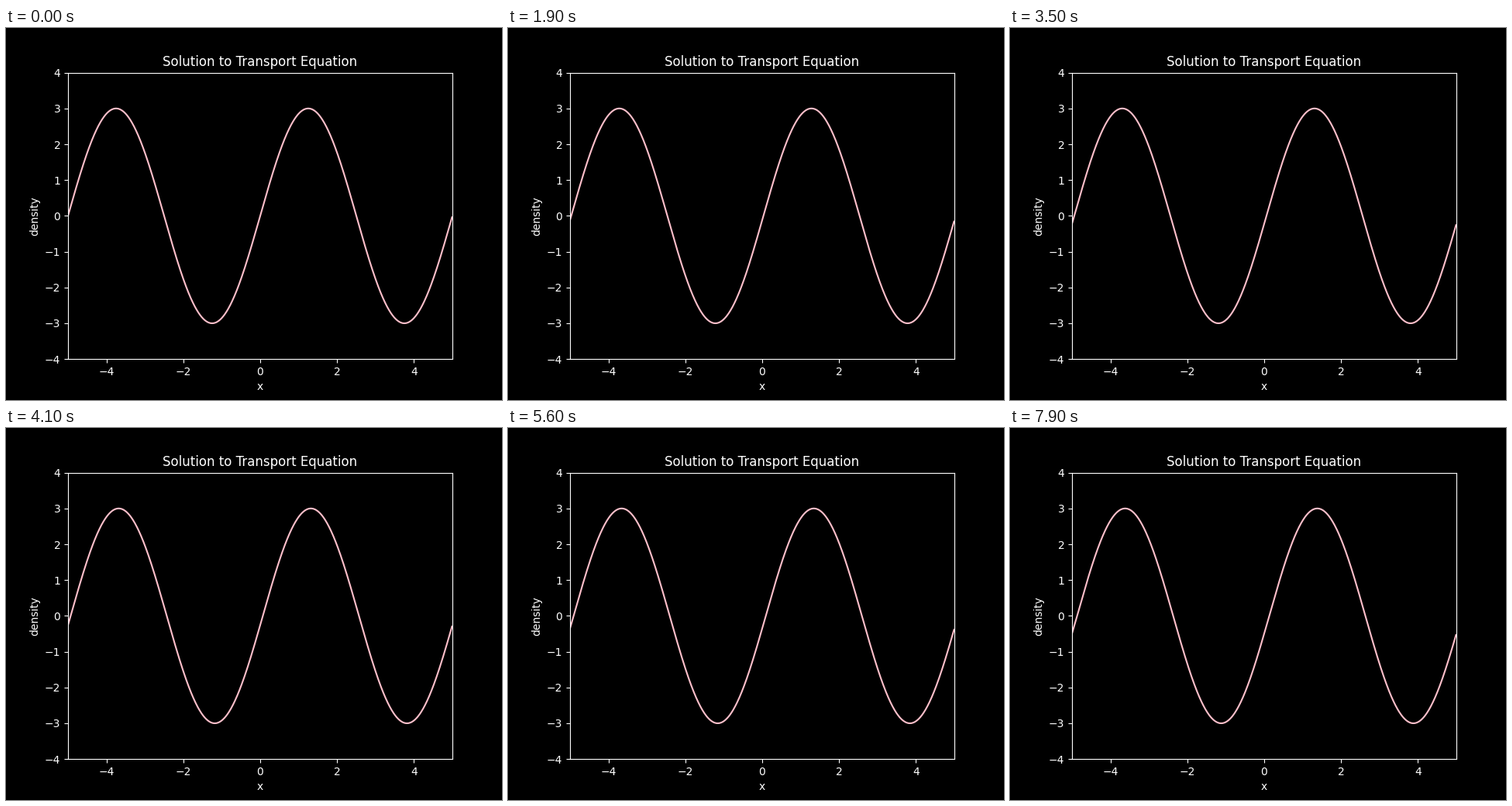
These frames come from a looping animation (640x480 px, 8000 ms). A matplotlib script:

```python
import numpy as np
import matplotlib.pyplot as plt
from matplotlib.animation import FuncAnimation

FRAMES = 80
INTERVAL = 100
AMPLITUDE = 3
WAVELENGTH = 5
STEP = 1 / 600  # distance travelled per frame

plt.style.use("dark_background")
plt.rcParams["font.family"] = "DejaVu Sans"

x = np.arange(-5, 5, 0.01)


def density(x, shift):
    return AMPLITUDE * np.sin(2 * np.pi * (x - shift) / WAVELENGTH)


fig, ax = plt.subplots(figsize=(6.4, 4.8), dpi=100)
ax.set(
    xlim=(-5, 5),
    ylim=(-4, 4),
    xlabel="x",
    ylabel="density",
    title="Solution to Transport Equation",
)
line, = ax.plot(x, density(x, 0), color="pink", lw=1.5)


def update(frame):
    line.set_ydata(density(x, frame * STEP))
    return line,


def init():
    return update(0)


anim = FuncAnimation(fig, update, frames=FRAMES, init_func=init,
                     interval=INTERVAL, repeat=True, repeat_delay=0)
plt.show()
```
